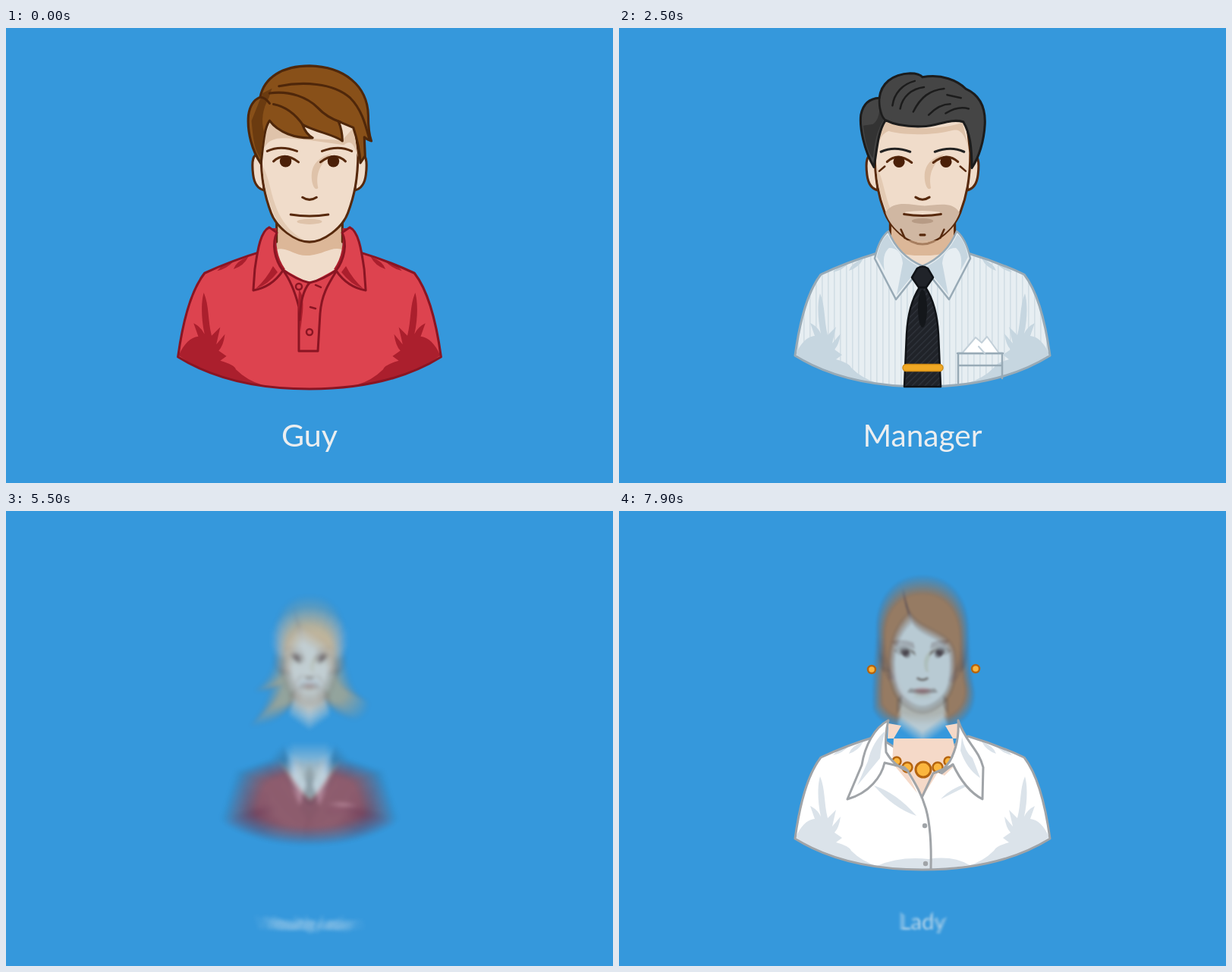
An HTML page for the animation above (8 s loop, 800 by 600 pixels).

```html
<!DOCTYPE html>
<html lang="en">
<head>
<meta charset="utf-8">
<title>Avatars</title>
<style>
  html, body { margin: 0; width: 100%; height: 100%; overflow: hidden; background: #3598dc; }
  svg { display: block; width: 100vw; height: 100vh; }
  text { font: 400 40px Lato, "Open Sans", sans-serif; fill: #ebeef0; text-anchor: middle; }
  path, ellipse, circle, rect { stroke-linejoin: round; stroke-linecap: round; }
  .layer { isolation: isolate; }
  .layer use { mix-blend-mode: plus-lighter; }
</style>
</head>
<body>
<svg id="stage" viewBox="0 0 800 600">
  <defs id="defs">
    <pattern id="pin" width="8" height="8" patternUnits="userSpaceOnUse">
      <rect width="8" height="8" fill="#e7eef2"/><rect x="3" width="1.6" height="8" fill="#d2dee5"/>
    </pattern>
    <pattern id="chalk" width="9" height="8" patternUnits="userSpaceOnUse">
      <rect width="9" height="8" fill="#38343a"/><rect x="4" width="1.3" height="8" fill="#4a3f4c"/>
    </pattern>
    <pattern id="twill" width="6" height="6" patternUnits="userSpaceOnUse" patternTransform="rotate(45)">
      <rect width="6" height="6" fill="#202329"/><rect width="1.2" height="6" fill="#30353d"/>
    </pattern>
  </defs>
</svg>
<script>
const fill = (color, d, extra = '') => `<path d="${d}" fill="${color}" ${extra}/>`;
const line = (color, width, d) => `<path d="${d}" fill="none" stroke="${color}" stroke-width="${width}"/>`;
const shape = (color, stroke, width, d) => fill(color, d, `stroke="${stroke}" stroke-width="${width}"`);
const dot = (x, y, r, color, stroke = 'none', width = 2.5) =>
  `<circle cx="${x}" cy="${y}" r="${r}" fill="${color}" stroke="${stroke}" stroke-width="${width}"/>`;
const oval = (x, y, rx, ry, color) => `<ellipse cx="${x}" cy="${y}" rx="${rx}" ry="${ry}" fill="${color}"/>`;
const both = art => `${art}<g transform="matrix(-1 0 0 1 800 0)">${art}</g>`;

const SKIN = '#f0dcca', SHADE = '#dfc3aa', INK = '#57290c';

// ---- faces ----
const face = (chin = 280) =>
  fill(SKIN, 'M358 250V302L400 332L442 302V250Z') +
  fill('#dcb798', 'M358 258V292Q400 306 442 292V258Z') +
  both(line(INK, 3, 'M358 256V280') +
    shape(SKIN, INK, 3, 'M338 170C327 164 326 178 328 194Q330 211 342 214Z')) +
  shape(SKIN, INK, 3, `M338 165C338 200 343 222 351 243C358 262 382 ${chin} 400 ${chin}S442 262 449 243C457 222 462 200 462 165L456 112H344Z`) +
  fill(SHADE, 'M340 182C341 210 348 228 356 248C364 264 380 276 394 278C374 268 362 250 356 232C350 215 349 200 340 182Z', 'opacity=".7"') +
  fill(SHADE, 'M428 167C405 174 400 188 404 206Q407 215 411 211C408 195 411 183 428 167Z') +
  both(line(INK, 3, 'M354 177Q368 164 386 178') + dot(369.5, 177, 7.5, '#4b2008')) +
  line(INK, 3, 'M391 223Q400 229 409 223') +
  oval(400, 254, 16, 3.5, SHADE) +
  line(INK, 3, 'M376 245Q400 249 424 245');

const brows = color => both(line(color, 3, 'M346 164Q363 156 384 164'));

const guy = face() + brows(INK) +
  fill(SHADE, 'M342 150L350 126L404 148L442 150L456 134L462 172C456 152 452 150 444 156L400 150C370 148 352 142 342 160Z') +
  shape('#885019', '#4f270a', 3, 'M338 180C327 164 320 140 322 118C324 104 330 98 337 95C342 70 365 55 400 55C444 56 474 80 475 118Q475 140 479 151Q473 149 470 146L471 170L465 179C464 160 460 146 456 134L437 126Q442 138 442 151C432 143 410 140 391 130Q395 142 404 147C382 148 360 140 349 125C342 135 341 155 338 180Z') +
  fill('#6b3b10', 'M326 125C328 150 330 162 337 172L342 140C338 125 340 110 348 96L352 84L340 90Z') +
  line('#4f270a', 3, 'M361 81C390 75 430 76 452 96C466 110 471 128 476 147M349 90C375 86 398 96 410 108Q422 121 440 127M354 104C370 107 383 118 392 131M338 95Q344 96 349 103');

const exec = face(284) +
  fill('#d0b7a2', 'M352 243C362 226 386 233 400 234S438 226 448 243C442 262 420 282 400 282S358 262 352 243Z') +
  oval(400, 254, 14, 3.5, '#b79b85') + fill(SKIN, 'M378 242Q400 239 422 242L424 246Q400 250 376 246Z') +
  line(INK, 3, 'M376 245Q400 249 424 245M397 272H403') +
  both(line(INK, 2.5, 'M344 189L351 183M372 265L377 276')) + brows('#222') +
  fill(SHADE, 'M344 150Q345 130 354 124C380 136 420 136 452 126L461 165C456 140 448 134 440 136C410 144 370 142 356 137Q348 140 344 150Z') +
  shape('#454545', '#1c1c1c', 3, 'M337 184C324 162 318 132 320 116Q324 95 344 94C346 76 360 63 384 62Q396 62 400 67C425 62 446 72 456 82C474 90 482 106 481 128C480 150 473 172 464 185C464 160 462 140 453 125C435 120 420 131 400 131Q370 132 352 123C342 138 341 160 337 184Z') +
  fill('#333', 'M323 130C326 155 331 168 336 172Q338 140 350 122L344 98Q346 120 336 128Z') +
  line('#1c1c1c', 2.5, 'M344 94Q343 116 353 124M361 104C363 88 374 76 390 72M371 108C374 92 386 82 402 80M388 112C398 92 410 84 428 82M408 116C418 106 426 102 436 102M430 114Q446 104 460 108M432 90L450 94');

const elder = face(285) +
  fill(SKIN, 'M344 150C340 110 360 90 400 89S460 110 456 150Z') +
  oval(400, 120, 27, 9, '#f8e9da') +
  both(oval(369, 190, 13, 5, SHADE) +
    line('#b9bcc8', 5, 'M347 166Q365 154 384 166') +
    line(INK, 2.5, 'M344 178L354 181M345 188L354 183') +
    line(INK, 3, 'M382 219C372 226 367 232 367 243M374 262L377 272') +
    shape('#dcdfe7', '#b3b8c6', 2, 'M337 184Q325 178 324 164Q317 150 322 140Q318 126 327 118Q328 104 340 101Q346 90 359 91Q368 81 382 84Q390 78 400 82V95C366 95 348 110 346 128Q348 146 344 156Z') +
    line('#b3b8c6', 2, 'M326 140L336 144M329 120L339 126M343 101L348 110M362 91L364 99M382 84L383 94')) +
  shape('#dcdfe7', '#b3b8c6', 2, 'M374 243Q376 227 400 231Q424 227 426 243Q400 239 374 243Z') +
  both(line('#b3b8c6', 1.5, 'M394 232V240M386 231L384 240')) +
  line(INK, 3, 'M378 245Q400 249 422 245') + line('#a88a72', 4, 'M397 271H403');

const womanHair = (back, front, color, ink) =>
  shape(color, ink, 3, back) + face() + brows(ink) +
  fill('#c46b5c', 'M380 245Q400 238 420 245Q400 257 380 245Z') + line(INK, 2.5, 'M377 245Q400 249 423 245') +
  shape(color, ink, 3, front) + line(ink, 3, 'M368 76Q370 96 379 112');

const young = womanHair(
  'M400 55C350 55 327 95 328 140C330 190 326 218 288 250Q308 252 318 247Q308 290 278 322C318 320 350 304 366 276H434C450 296 480 312 500 308Q524 296 521 272C484 258 472 200 472 140C473 95 450 55 400 55Z',
  'M400 55C350 55 327 95 328 140Q330 190 340 220C340 180 352 140 379 112C408 132 446 145 456 180Q462 200 460 220C472 190 474 160 472 140C473 95 450 55 400 55Z',
  '#e9a35c', '#935019');

const lady = womanHair(
  'M400 55C350 55 325 95 325 140C324 190 316 230 320 274Q330 296 360 302L374 270H428L442 302C472 296 488 270 484 240C476 205 477 180 475 140C473 95 450 55 400 55Z',
  'M400 55C350 55 325 95 325 140Q326 200 346 228C338 180 350 136 379 112C400 146 450 140 455 184Q457 210 452 230C475 200 476 170 475 140C473 95 450 55 400 55Z',
  '#b5662a', '#633012');

// ---- bodies ----
const TORSO = 'M232 432C238 388 248 348 266 325Q300 309 340 297L400 335L460 297Q500 309 534 325C552 348 562 388 568 432C520 462 460 473 400 473S280 462 232 432Z';
const folds = color => both(
  fill(color, 'M233 430C240 415 248 407 258 406L252 389Q262 394 266 403C261 380 262 360 265 350C272 366 270 386 275 405L286 394L281 416L292 403Q290 418 284 424L294 431L286 437Q304 442 306 448Q320 462 340 468C300 466 260 450 233 430Z') +
  fill(color, 'M303 320Q306 310 322 304Q316 316 303 320ZM282 322Q290 312 304 309Q294 320 282 322Z'));
const chest = bottom => fill(SKIN, `M358 300H442L438 318L400 ${bottom}L362 318Z`);

const RED = '#dd434f', WINE = '#8a1523', DEEP = '#ab1f2d';
const polo = fill(RED, TORSO) + folds(DEEP) + line(WINE, 3, TORSO) +
  `<g transform="translate(400 379) scale(.97) translate(-400 -379)">` +
  fill(SKIN, 'M357 290H443L440 315L400 337L360 315Z') +
  fill('#dcb798', 'M357 284V292C372 288 380 302 400 300S428 288 443 292V284Z') +
  both(fill(DEEP, 'M347 264C350 290 355 308 364 320L368 318C357 302 355 286 357 264Z')) +
  shape(RED, WINE, 3, 'M364 318Q378 336 386 368V426H411L414 376C416 350 426 336 437 318Q418 332 400 336Q382 332 364 318Z') +
  fill(DEEP, 'M386 345Q393 352 391 375L388 400L385 365Z') +
  line(WINE, 3, 'M400 336Q388 350 387 385') +
  both(shape(RED, WINE, 3, 'M347 263C336 268 332 290 328 318L326 346Q350 342 365 320C354 305 350 285 357 270Z') +
    fill(DEEP, 'M329 344Q346 338 358 322L352 314Q344 330 329 344Z')) +
  dot(386, 341, 4, RED, WINE) + dot(400, 401, 4, RED, WINE) + line(WINE, 2.5, 'M408 339L415 342M401 368L408 370') + '</g>';

const PALE = '#c6d6e0', STEEL = '#98aab6';
const collars = both(
  shape('#e7eef2', STEEL, 2.5, 'M355 268C345 276 340 290 337 304L365 358L400 314Q368 300 355 268Z') +
  fill(PALE, 'M354 272C345 280 342 292 340 302L350 320Q346 298 356 290Q372 290 374 310L366 352L396 315Q368 302 354 272Z'));
const knot = shape('#202329', '#101317', 2.5, 'M393 317Q400 312 407 317L414 329L405 342H395L386 329Z');
const blade = end => shape('url(#twill)', '#101317', 2.5, `M396 342H404C417 362 420 385 421 404${end}L379 404C380 385 383 362 396 342Z`) +
  oval(400, 370, 6, 25, '#14171b');

const shirt = fill('url(#pin)', TORSO) + folds(PALE) +
  shape('none', STEEL, 2.5, 'M447 468V429H505V462M447 445H505') +
  shape('#fff', '#c3d0d9', 2, 'M452 429L470 408L478 415L485 407L501 429Z') +
  line(STEEL, 2.5, 'M446 429H506') + line('#c3d0d9', 2, 'M474 420L482 429') +
  line(STEEL, 3, TORSO) + chest(316) +
  fill('#dcb798', 'M360 286Q400 312 440 286V280H360Z', 'opacity=".6"') + collars +
  blade('L424 473H376') + knot +
  '<rect x="374" y="443.5" width="53" height="9" rx="4.5" fill="#f0a824" stroke="#d18c14" stroke-width="1.5"/>';

const COAL = '#18191b';
const suit = fill('url(#pin)', 'M347 271L400 312L453 271L450 370L400 434L350 370Z') + chest(316) + collars + blade('L400 434') + knot +
  both(fill('url(#chalk)', 'M218 421C230 385 240 350 246 328Q248 321 258 320L320 299L347 270C348 340 370 400 400 432V473C330 473 262 458 218 421Z') +
    fill('#2a282b', 'M226 424C240 400 248 380 250 350L262 382L268 432L300 452Q282 456 262 446Z', 'opacity=".65"') +
    line(COAL, 2.5, 'M253 322C264 365 269 395 268 430M292 408Q288 436 302 452')) +
  line(COAL, 3.5, 'M347 270L320 299L258 320Q248 321 246 328C240 350 230 385 218 421C262 458 330 473 400 473S538 458 582 421C570 385 560 350 554 328Q552 321 542 320L480 299L453 270') +
  both(shape('url(#chalk)', COAL, 3, 'M347 270Q330 284 320 299L303 320L318 323L303 337C330 382 362 420 393 440L400 432C370 400 348 345 347 270Z')) +
  line(COAL, 3, 'M400 432Q388 444 388 472M408 459H417') + dot(400, 459, 5.5, '#38343a', COAL) +
  shape('#f1f4f6', '#bcc4ca', 1.5, 'M452 399L484 388L488 392L497 390L502 399Z') +
  '<rect x="446" y="400" width="58" height="19" fill="#332f35" stroke="#18191b" stroke-width="2.5"/>';

const GOLD = '#fbb63e', AMBER = '#b5640f';
const vneck = fill(SKIN, 'M360 264H440V300L470 305L402 386L330 305L360 300Z') +
  fill(RED, 'M226 432C232 388 246 345 264 325Q300 308 334 300L402 386L466 300Q500 308 536 325C554 345 568 388 574 432C520 462 460 473 400 473S280 462 226 432Z') + folds(DEEP) +
  line(WINE, 3, 'M334 300Q300 308 264 325C246 345 232 388 226 432C280 462 340 473 400 473S520 462 574 432C568 388 554 345 536 325Q500 308 466 300') +
  line('#ee7a62', 8, 'M336 302Q360 350 402 386Q442 350 464 302') + line(WINE, 2.5, 'M331 304Q356 354 402 392Q446 354 469 304') +
  line(INK, 3, 'M361 298Q400 312 439 298') + dot(400, 306, 6, '#d9c7a0', INK) + both(dot(384, 304, 3, '#d9c7a0', INK, 2));

const GREY = '#a0a4a8', MIST = '#dbe3ea';
const blouse = fill('#fff', TORSO) + folds(MIST) +
  fill(MIST, 'M340 468Q370 455 408 459Q440 454 462 467Q400 477 340 468ZM336 362Q366 372 392 402Q362 392 336 362ZM424 380Q440 362 470 357Q444 370 424 380Z') +
  line(GREY, 3, TORSO) +
  fill('#f5d9c8', 'M362 300H440L446 332L399 379L360 332ZM355 280L372 283L362 300H354ZM447 280L430 283L440 300H448Z') +
  both(dot(366, 330, 5.5, GOLD, AMBER) + dot(380, 338, 6.5, GOLD, AMBER)) + dot(401, 341, 10, GOLD, AMBER, 3) +
  shape('#fff', GREY, 3, 'M355 276C336 286 324 310 320 335L301 380C330 372 346 350 350 332L376 338L381 343L399 378Q378 392 350 360L330 340Z'.replace('L399 378Q378 392 350 360L330 340Z', 'Q362 336 352 318Q350 296 355 276Z')) +
  shape('#fff', GREY, 3, 'M447 276C456 304 474 314 480 338L479 380Q456 368 440 334L420 350L436 330Q449 306 447 276Z') +
  fill(MIST, 'M351 290Q334 304 328 330L314 362L344 326Q346 306 351 290ZM452 298Q456 318 466 326L476 352Q458 340 450 316Z') +
  fill('#fff', 'M379 342L399 379L420 345L436 352L411 410Z') +
  line(GREY, 3, 'M380 342C402 378 413 398 411 472M399 378L414 346L438 336') +
  dot(403, 415, 3.2, GREY) + dot(404, 465, 3.2, GREY) +
  dot(333, 209, 5, GOLD, AMBER) + dot(470, 208, 5, GOLD, AMBER);

// ---- timeline ----
const LOOP = 8000, STEP = 100, COPIES = 16;
const ART = { guy, exec, elder, young, lady, polo, shirt, suit, vneck, blouse };
const SWAPS = [
  [-500, 'guy', 'polo', 'Guy'],
  [700, 'guy', 'shirt', 'White collar'],
  [1900, 'exec', 'shirt', 'Manager'],
  [3100, 'exec', 'suit', 'Businessman'],
  [4300, 'elder', 'suit', 'Wealthy man'],
  [5500, 'young', 'vneck', 'Young lady'],
  [6700, 'lady', 'blouse', 'Lady'],
  [7940, '', 'blouse', '']
];
const ORIGIN = { 1: 214, 2: 379, 3: 552 };   // vertical zoom centre of head, body, label

// keys are [ms from the swap, value]
const SCALE = [[-200, 1], [-100, 1.04], [0, .52], [100, .97], [200, 1.17], [300, 1.11], [400, 1.06], [500, 1.032], [600, 1.015], [800, 1]];
const BLUR = [[-200, 0], [-100, .015], [0, .12], [100, .06], [200, .025], [300, .01], [400, 0]];
const FADE_IN = [[-40, 0], [0, .5], [60, 1]];
const FADE_OUT = [[-100, 1], [0, .5], [60, 0]];

function at(keys, t) {
  if (t <= keys[0][0]) return keys[0][1];
  for (let i = 1; i < keys.length; i++) {
    const [t0, a] = keys[i - 1], [t1, b] = keys[i];
    if (t <= t1) return a + (b - a) * (t - t0) / (t1 - t0);
  }
  return keys[keys.length - 1][1];
}

const stage = document.getElementById('stage');
const layers = [];
let defs = '', groups = '';
for (const part of [1, 2, 3]) {
  SWAPS.forEach((row, i) => {
    const name = row[part];
    if (!name || (i && SWAPS[i - 1][part] === name)) return;
    const next = SWAPS.find((r, j) => j > i && r[part] !== name);
    const id = 'art' + layers.length;
    layers.push({ start: row[0], end: next ? next[0] : Infinity, y: ORIGIN[part] });
    defs += `<g id="${id}">${part === 3 ? `<text x="400" y="552">${name}</text>` : ART[name]}</g>`;
    groups += `<g class="layer">${`<use href="#${id}"/>`.repeat(COPIES)}</g>`;
  });
}
document.getElementById('defs').insertAdjacentHTML('beforeend', defs);
stage.insertAdjacentHTML('beforeend', groups);
stage.querySelectorAll('.layer').forEach((node, i) => layers[i].node = node);

function draw(t) {
  for (const { start, end, y, node } of layers) {
    const alpha = at(FADE_IN, t - start) * at(FADE_OUT, t - end);
    node.style.display = alpha ? '' : 'none';
    if (!alpha) continue;
    const phase = t - end > -200 ? t - end : t - start;
    const scale = at(SCALE, phase), blur = at(BLUR, phase);
    const count = blur ? COPIES : 1;
    node.style.opacity = alpha;
    node.style.filter = blur ? `blur(${blur * 20}px)` : 'none';
    [...node.children].forEach((copy, i) => {
      copy.style.display = i < count ? '' : 'none';
      if (i >= count) return;
      const s = scale + (count > 1 ? blur * (2 * i / (count - 1) - 1) : 0);
      copy.style.opacity = 1 / count;
      copy.setAttribute('transform', `translate(400 ${y}) scale(${s}) translate(-400 ${-y})`);
    });
  }
}

const begin = performance.now();
let shown = -1;
function tick() {
  const t = Math.floor((performance.now() - begin) % LOOP / STEP) * STEP;
  if (t !== shown) draw(shown = t);
  requestAnimationFrame(tick);
}
tick();
</script>
</body>
</html>
```
